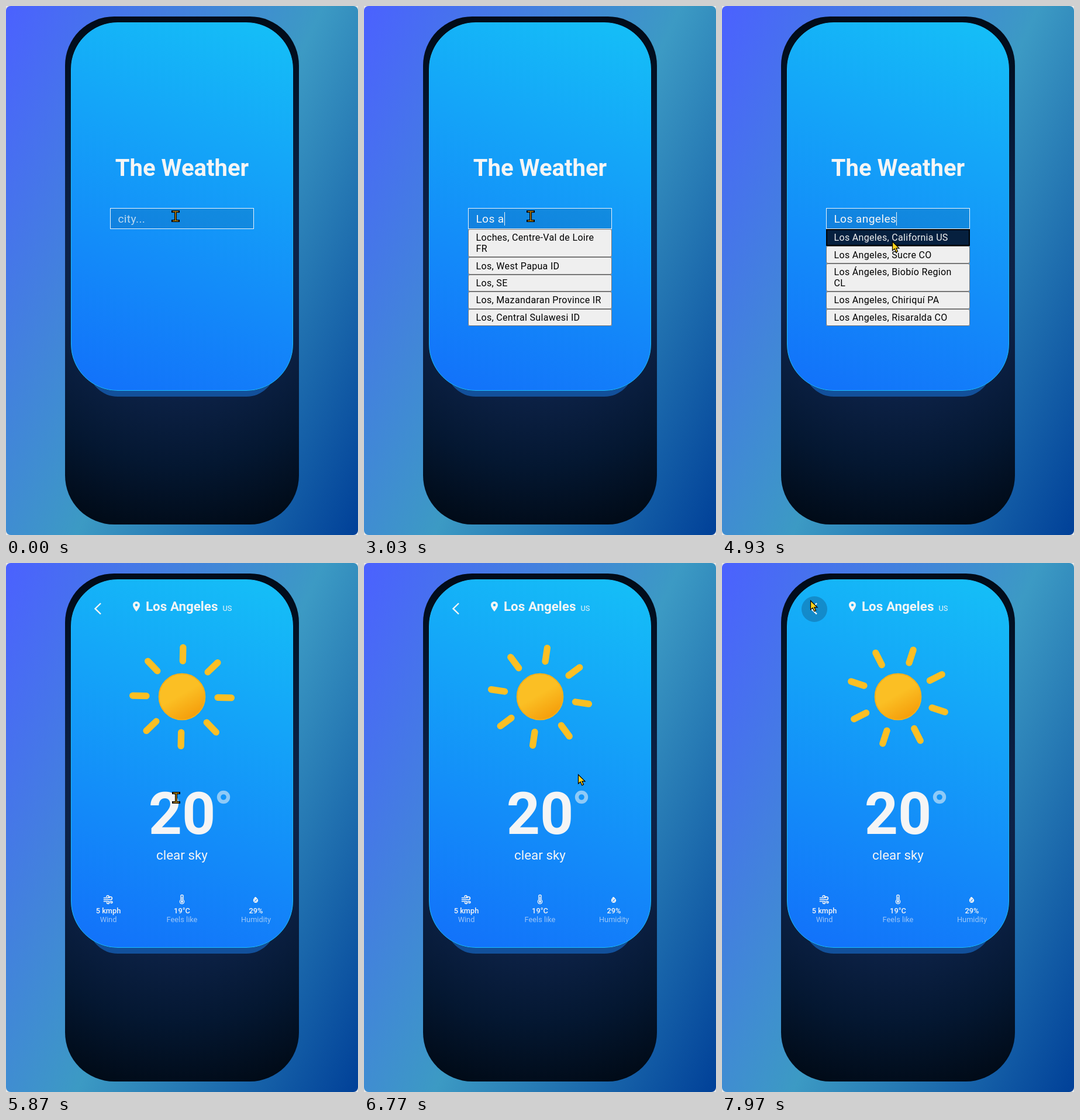
Recreate the animation shown at these times as an HTML page. Size 602 by 906 pixels, loop 8 s.

```html
<!DOCTYPE html>
<html lang="en">
<head>
<meta charset="utf-8">
<title>The Weather</title>
<style>
  html, body { margin: 0; width: 100%; height: 100%; overflow: hidden; background: #e6e6e6; }
  body, text { font-family: Roboto, sans-serif; }
  .stage {
    position: absolute; width: 602px; height: 906px; overflow: hidden; border-radius: 8px;
    background: linear-gradient(115deg, #4b61ff, #3c9ac4 53%, #004098);
  }
  .phone, .card, svg, .list { position: absolute; }
  .phone {
    left: 101px; top: 18px; width: 400px; height: 870px; border-radius: 84px;
    background: radial-gradient(circle farthest-corner, #14305e, #0c2145 45%, #041731 70%, #000812);
  }
  .card {
    left: 111px; top: 28px; width: 380px; height: 631px; box-sizing: border-box;
    border: 1px solid #1bbdfb; border-radius: 80px;
    background: linear-gradient(200deg, #15c0f7, #1270fa);
    box-shadow: 0 40px 0 -30px #12509b;
  }
  svg { left: 0; top: 0; }
  text { fill: #f5f5f5; }
  .mid { text-anchor: middle; }
  .typed { font-size: 19.2px; letter-spacing: .02em; white-space: pre; }
  .stat { font-size: 12.8px; text-anchor: middle; }
  .value { font-weight: 500; }
  .dim { fill-opacity: .6; }
  .line { fill: none; stroke: #f5f5f5; stroke-linecap: round; stroke-linejoin: round; }
  .list { left: 178px; top: 382px; width: 246px; }
  .row {
    box-sizing: border-box; padding: 5.2px 13.6px; border-radius: 3px;
    background: #efefef; box-shadow: inset 0 0 0 1px #767676;
    color: #000; font-size: 16px; line-height: 19px; letter-spacing: .02em;
  }
  .row.hover { background: #06203f; color: #f0f0f0; border-radius: 0; box-shadow: inset 0 0 0 2px #000; }
</style>
</head>
<body>
<div class="stage">
  <div class="phone"></div>
  <div class="card"></div>

  <svg width="602" height="906">
    <defs>
      <linearGradient id="gold" gradientUnits="userSpaceOnUse" x1="-5.25" y1="-9.09" x2="5.25" y2="9.09">
        <stop offset=".45" stop-color="#fbbf24"/>
        <stop offset="1" stop-color="#f59e0b"/>
      </linearGradient>
    </defs>

    <g id="search">
      <text class="mid" x="301" y="291" font-size="40" font-weight="700">The Weather</text>
      <rect x="178.5" y="346.5" width="245" height="35" fill="#000" fill-opacity=".1" stroke="#eef4fa"/>
      <text id="hint" class="typed" x="191.4" y="371" fill-opacity=".75">city...</text>
      <text id="typed" class="typed" x="191.4" y="371"></text>
      <rect id="caret" y="353" width="1" height="23" fill="#f5f5f5"/>
    </g>

    <g id="weather">
      <circle id="halo" cx="158" cy="79" r="22" fill="#123a60" fill-opacity=".3"/>
      <path class="line" stroke-width="2.4" style="stroke-linecap:butt;stroke-linejoin:miter" d="M162 69 152.500 78.200 162 87.500"/>
      <path fill="#f5f5f5" fill-rule="evenodd" d="M223 66c-3.500 0-6 2.600-6 5.900 0 4.200 6 11.100 6 11.100s6-6.900 6-11.100c0-3.300-2.500-5.900-6-5.900zm0 3.800a2.200 2.200 0 1 1 0 4.400 2.200 2.200 0 0 1 0-4.400z"/>
      <text x="239" y="82" font-size="22.4" font-weight="700">Los Angeles</text>
      <text x="370.500" y="82" font-size="12.8">US</text>

      <g id="sun" transform="translate(301 229) scale(3.75)">
        <circle r="10.5" fill="url(#gold)" stroke="#f8af18" stroke-width=".5"/>
        <g id="rays" stroke="#fbbf24" stroke-width="3" stroke-linecap="round"></g>
      </g>

      <text class="mid" x="301" y="464" font-size="100" font-weight="700">20</text>
      <circle cx="372" cy="401" r="8" fill="none" stroke="#f5f5f5" stroke-opacity=".55" stroke-width="6.4"/>
      <text class="mid" x="301" y="508" font-size="22.4">clear sky</text>

      <g class="line" stroke-width="1.7">
        <path d="M167.500 573.500h6.500a2 2 0 1 0-2-2.200M167.500 576.500h11.500a2.400 2.400 0 1 0-2.300-3.200M167.500 579.500h7a2 2 0 1 1-2 2.200M178 579.500h2.500a1.500 1.500 0 1 1-1.500 2"/>
      </g>
      <g class="line" stroke-width="1.3">
        <path d="M298.800 577v-6.300a2.200 2.200 0 0 1 4.400 0v6.300a3.700 3.700 0 1 1-4.400 0z"/>
        <path d="M301 572v8" stroke-width="1.5"/>
      </g>
      <circle cx="301" cy="580" r="1.900" fill="#f5f5f5"/>
      <path fill="#f5f5f5" d="M426.500 571c-1.500 2.500-3.700 4.400-3.700 6.700a4.200 4.200 0 0 0 8.400 0c0-2.300-3-4.200-4.700-6.700z"/>
      <path d="M425 579.800l4-4M425.200 575.700h.8M428.300 579.700h.8" stroke="#1683f5" stroke-width="1.100"/>

      <text class="stat value" x="175" y="600">5 kmph</text>
      <text class="stat value" x="301" y="600">19°C</text>
      <text class="stat value" x="427.500" y="600">29%</text>
      <text class="stat dim" x="175" y="615">Wind</text>
      <text class="stat dim" x="301" y="615">Feels like</text>
      <text class="stat dim" x="427.500" y="615">Humidity</text>
    </g>
  </svg>

  <div class="list" id="list"></div>

  <svg width="602" height="906">
    <g id="pointer" stroke="#000">
      <path id="arrow" d="M.5.5V16l3.600-3.300 2.700 6 2.700-1.200-2.600-5.700H12z" fill="#ffd21a" stroke-width="1.200"/>
      <g id="beam" fill="none">
        <path d="M-5-8H5M-5 8H5M0-8V8" stroke-width="4" stroke-linecap="square"/>
        <path d="M-5-8H5M-5 8H5M0-8V8" stroke="#b8860b" stroke-width="1.600"/>
      </g>
    </g>
  </svg>
</div>

<script>
const LOOP = 8000, OPENED = 5600, SUN_START = 5713;
const $ = id => document.getElementById(id);
const show = (id, on) => { $(id).style.display = on ? '' : 'none'; };

const cities = {
  first: ['New York County, New York US', 'New York, England GB', 'New York, Missouri US',
    'New York, Bo District SL', 'Lake Oswego, Oregon US'],
  partial: ['Loches, Centre-Val de Loire FR', 'Los, West Papua ID', 'Los, SE',
    'Los, Mazandaran Province IR', 'Los, Central Sulawesi ID'],
  full: ['Los Angeles, California US', 'Los Angeles, Sucre CO', 'Los Ángeles, Biobío Region CL',
    'Los Angeles, Chiriquí PA', 'Los Angeles, Risaralda CO']
};

// Steps hold from their time until the next one.
const typing = [[0, ''], [1900, 'L'], [2000, 'Lo'], [2100, 'Los'], [2700, 'Los '], [2930, 'Los a'],
  [3130, 'Los an'], [3370, 'Los ang'], [3470, 'Los ange'], [3570, 'Los angel'],
  [3630, 'Los angele'], [3830, 'Los angeles']];
const results = [[0, ''], [1900, 'first'], [2130, 'partial'], [3100, 'full'], [OPENED, '']];
const blink = [[0, false], [330, true], [870, false], [1400, true], [2630, false], [2700, true],
  [4370, false], [4900, true], [5430, false]];
const path = [[0, 290, 360], [29, 290, 360], [30, 285, 360], [4740, 285, 360], [4930, 291, 403],
  [6150, 291, 403], [6400, 342, 377], [6770, 366, 362], [7000, 262, 352], [7230, 115, 340],
  [7400, 105, 290], [7700, 138, 140], [7880, 151, 64], [LOOP, 151, 64]];

const stepAt = (steps, t) => steps.findLast(([time]) => time <= t)[1];

function pointerAt(t) {
  const i = path.findIndex(([time]) => time > t);
  const [t0, x0, y0] = path[i - 1], [t1, x1, y1] = path[i];
  const p = (t - t0) / (t1 - t0);
  return [x0 + (x1 - x0) * p, y0 + (y1 - y0) * p];
}

for (let a = 0; a < 360; a += 45) {
  $('rays').innerHTML += `<path d="M0-16.290V-22.500" transform="rotate(${a})"/>`;
}

let listed = '';
function fillList(name) {
  if (name === listed) return;
  listed = name;
  $('list').innerHTML = (cities[name] || []).map(city => `<div class="row">${city}</div>`).join('');
}

function draw(t) {
  const opened = t >= OPENED;
  const text = stepAt(typing, t);
  const [x, y] = pointerAt(t);

  show('search', !opened);
  show('weather', opened);
  show('hint', !text);
  $('typed').textContent = text;
  show('caret', stepAt(blink, t));
  if (!opened) $('caret').setAttribute('x', Math.round(191.4 + (text ? $('typed').getComputedTextLength() : 0)));

  fillList(stepAt(results, t));
  const top = $('list').firstElementChild;
  if (top) top.classList.toggle('hover', y > 382);

  show('sun', t >= SUN_START - 13);
  $('rays').setAttribute('transform', `rotate(${Math.max(0, t - SUN_START) * 360 / 45000})`);
  show('halo', Math.hypot(x - 158, y - 79) < 22);

  const overText = opened ? y > 390 && x > 243 && x < 359 : y < 382;
  show('beam', overText);
  show('arrow', !overText);
  $('pointer').setAttribute('transform', `translate(${Math.round(x)} ${Math.round(y) - (opened && overText ? 1 : 0)})`);
}

const start = performance.now();
function tick() {
  draw((performance.now() - start) % LOOP);
  requestAnimationFrame(tick);
}
tick();
</script>
</body>
</html>
```
